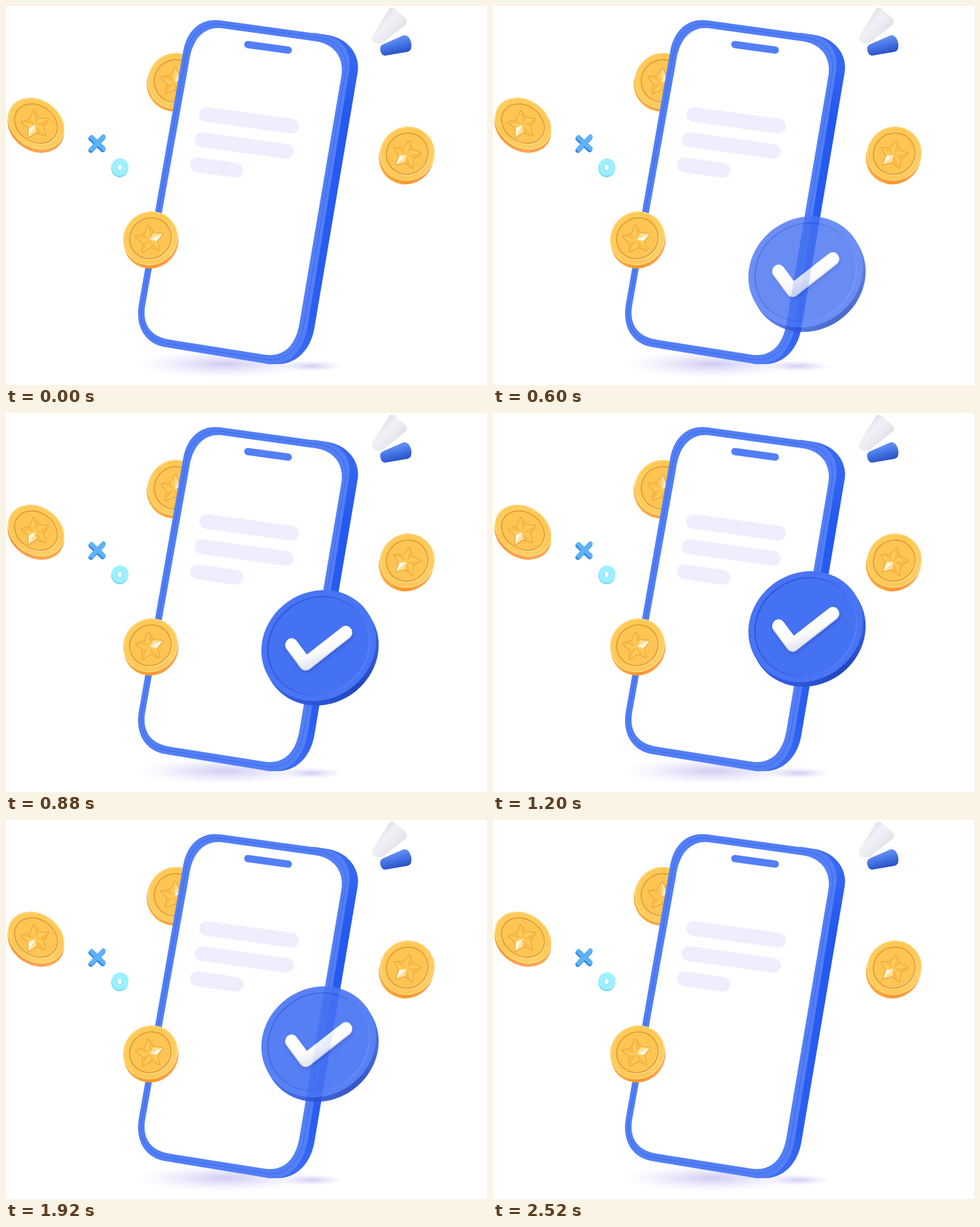
An HTML page for the animation above (2640 ms loop, 736 by 580 pixels).

```html
<!DOCTYPE html>
<html lang="en">
<head>
<meta charset="utf-8">
<title>Payment confirmed</title>
<style>
  html, body { margin: 0; width: 100%; height: 100%; overflow: hidden; background: #fff; }
  svg { display: block; width: 736px; height: 580px; }
</style>
</head>
<body>
<svg viewBox="0 0 736 580" xmlns="http://www.w3.org/2000/svg">
  <defs>
    <radialGradient id="shade">
      <stop offset="0" stop-color="#a9a3ea" stop-opacity=".55"/>
      <stop offset=".5" stop-color="#bbb7f0" stop-opacity=".28"/>
      <stop offset="1" stop-color="#d8d6fa" stop-opacity="0"/>
    </radialGradient>
    <linearGradient id="gold" x1="0" y1="0" x2="1" y2="1">
      <stop offset="0" stop-color="#ffcd60"/>
      <stop offset=".6" stop-color="#ffc853"/>
      <stop offset="1" stop-color="#ffd36c"/>
    </linearGradient>
    <linearGradient id="edge" x1="0" y1="0" x2="1" y2="1">
      <stop offset="0" stop-color="#ffbb48"/>
      <stop offset=".6" stop-color="#f8962e"/>
      <stop offset="1" stop-color="#ffb070"/>
    </linearGradient>
    <linearGradient id="side" x1="0" y1="0" x2="0" y2="1">
      <stop offset="0" stop-color="#3c6cf2"/>
      <stop offset=".25" stop-color="#2459f0"/>
      <stop offset=".85" stop-color="#2a5ef2"/>
      <stop offset="1" stop-color="#3f6cf2"/>
    </linearGradient>
    <linearGradient id="white" x1=".2" y1=".2" x2=".8" y2=".8">
      <stop offset="0" stop-color="#d9d9e4"/>
      <stop offset=".35" stop-color="#f0f0f6"/>
      <stop offset=".7" stop-color="#e9e9f0"/>
      <stop offset="1" stop-color="#d6d6de"/>
    </linearGradient>
    <linearGradient id="blue" x1=".2" y1="0" x2=".6" y2="1">
      <stop offset="0" stop-color="#7ba3f8"/>
      <stop offset=".5" stop-color="#4a78e8"/>
      <stop offset="1" stop-color="#2149bd"/>
    </linearGradient>
    <linearGradient id="rim" x1="0" y1="0" x2="1" y2="0">
      <stop offset="0" stop-color="#345ee2"/>
      <stop offset=".55" stop-color="#2145bd"/>
      <stop offset="1" stop-color="#3a62e0"/>
    </linearGradient>
    <linearGradient id="groove" x1=".2" y1="0" x2=".8" y2="1">
      <stop offset="0" stop-color="#2c53cf"/>
      <stop offset=".55" stop-color="#3a64e4"/>
      <stop offset="1" stop-color="#6189fc"/>
    </linearGradient>
    <linearGradient id="ivory" gradientUnits="userSpaceOnUse" x1="470" y1="330" x2="482" y2="364">
      <stop offset="0" stop-color="#fff"/>
      <stop offset=".6" stop-color="#fbfbfd"/>
      <stop offset="1" stop-color="#e6e8f2"/>
    </linearGradient>
    <filter id="soft" x="-30%" y="-30%" width="160%" height="160%"><feGaussianBlur stdDeviation="2.6"/></filter>
    <path id="tick" d="M437 338 L458.500 367 L520 319" fill="none" stroke-linecap="round" stroke-linejoin="round"/>
    <path id="cross" d="M131 201 L149 218 M149 200 L131 219" fill="none" stroke-linecap="round"/>
  </defs>

  <ellipse cx="335" cy="548" rx="138" ry="21" fill="url(#shade)"/>
  <ellipse cx="468" cy="551" rx="50" ry="9" fill="url(#shade)"/>

  <g id="back"></g>

  <g id="phone">
    <path fill="url(#side)" d="M470 41 L490 44 C521 48 543 73 538 102 L472 492 C467 524 446 547 418 548 L400 548 Z"/>
    <path fill="#527ff7" d="M271 70 C277 36 299 18 328 22 L484 43.500 C513 47.500 530 69 525 100 L462 488 C456 525 436 551 402 548 L244 522 C212 517 198 490 203 458 Z"/>
    <path fill="none" stroke="#3d69e2" stroke-width="1" d="M275 78 C280 43 301 25 329 28 L480 48.500 C509 52.500 524 75 519 104 L456 487 C450 522 431 545 398 541 L247 516.500 C217 511.500 203 489 208 458 Z"/>
    <path fill="#fff" d="M280 86 C285 50 303 31 330 34 L474 54 C503 58 518 80 513 108 L449 486 C443 520 425 538 395 533.500 L250 510.500 C221 506 208 487 213 458 Z"/>
    <path stroke="#527ff7" stroke-width="11" stroke-linecap="round" d="M370 59 L432 67.500"/>
    <path stroke="#eeeeff" stroke-width="22.500" stroke-linecap="round" d="M307 166 L437 184 M300 204.500 L429 222.500 M293 243 L352 251.500"/>
  </g>

  <g id="front"></g>

  <use href="#cross" y="2" x="-1" stroke="#3384da" stroke-width="7.500"/>
  <use href="#cross" stroke="#5eb2f8" stroke-width="7"/>
  <ellipse cx="174" cy="248.500" rx="13" ry="13.500" fill="#74d9ee"/>
  <ellipse cx="174.500" cy="246.500" rx="13" ry="13.300" fill="#9cf0ff"/>
  <ellipse cx="174" cy="247" rx="3.600" ry="4.800" fill="#fff" stroke="#7fdcf0"/>

  <path fill="url(#white)" d="M586 5 Q589 1 594 4 L611 18 Q615 22 612 28 L577 56 Q568 60 561 54 Q558 50 561 45 Z"/>
  <path fill="url(#blue)" d="M576 59 L608 45 Q616 43 620 56 Q622 68 615 70 L580 76 Q575 76 573 69 Q571 62 576 59 Z"/>

  <g id="badge" opacity="0">
    <g transform="translate(4 7) rotate(-35 478.500 339.500)">
      <ellipse cx="478.500" cy="339.500" rx="90.500" ry="82" fill="url(#rim)"/>
    </g>
    <g transform="rotate(-35 478.500 339.500)">
      <ellipse cx="478.500" cy="339.500" rx="90.500" ry="82" fill="#4875f6"/>
      <ellipse cx="478.500" cy="340" rx="80" ry="73" fill="#4572f2"/>
    </g>
    <ellipse cx="478.500" cy="340" rx="80" ry="73" fill="none" stroke="url(#groove)" stroke-width="2" transform="rotate(-35 478.500 340)"/>
    <use href="#tick" x="1" y="4" stroke="#274cc4" stroke-opacity=".55" stroke-width="20" filter="url(#soft)"/>
    <use href="#tick" y="1" stroke="#d9dcec" stroke-width="20"/>
    <use href="#tick" y="-.5" stroke="url(#ivory)" stroke-width="18.500"/>
  </g>
</svg>
<script>
  const STEP = 40, LOOP = 2640;
  const badge = document.getElementById('badge');
  const clamp = v => Math.min(1, Math.max(0, v));

  // Ten facets around the centre, alternately lit, with two bright ones.
  function star(radius, turn, lit) {
    const at = i => {
      const a = (turn - 90 + i * 36) * Math.PI / 180;
      const r = i % 2 ? radius * 0.52 : radius;
      return `${(r * Math.cos(a)).toFixed(1)} ${(r * Math.sin(a)).toFixed(1)}`;
    };
    let outline = '', facets = '';
    for (let i = 0; i < 10; i++) {
      outline += (i ? 'L' : 'M') + at(i);
      const fill = i === lit ? '#fff8e4' : i === (lit + 9) % 10 ? '#ffe09a' : i % 2 ? '#ffcb5a' : '#fcbb46';
      facets += `<path fill="${fill}" d="M0 0L${at(i)}L${at(i + 1)}Z"/>`;
    }
    return `<path d="${outline}Z" fill="#e0943a" stroke="#e0943a" stroke-width="2.600" stroke-linejoin="round"/>` +
      `<path d="${outline}Z" fill="#ffcb5a" stroke="#ffcb5a" stroke-width="1" stroke-linejoin="round"/>${facets}`;
  }

  function coin(layer, { x, y, rx, ry, tilt, dx, dy, turn, lit }) {
    const disc = (k, attrs) => `<ellipse rx="${rx * k}" ry="${ry * k}" transform="rotate(${tilt})" ${attrs}/>`;
    document.getElementById(layer).innerHTML += `<g transform="translate(${x} ${y})">
      <g transform="translate(${dx} ${dy})">${disc(1, 'fill="url(#edge)"')}</g>
      ${disc(1, 'fill="url(#gold)"')}
      ${disc(0.985, 'fill="none" stroke="#ffe09a" stroke-width="1"')}
      <g transform="translate(.8 1)">${disc(0.76, 'fill="none" stroke="#ffe6b0" stroke-width="1.500"')}</g>
      ${disc(0.76, 'fill="#fec553" stroke="#dd9434" stroke-width="1.500"')}
      <g transform="translate(-1 2)">${star(21.5, turn, lit)}</g></g>`;
  }

  coin('back', { x: 259, y: 114.5, rx: 43, ry: 42, tilt: -60, dx: -1.5, dy: 4, turn: 3, lit: 1 });
  coin('front', { x: 46, y: 180, rx: 46, ry: 36.5, tilt: 34, dx: -0.5, dy: 5, turn: -7, lit: 6 });
  coin('front', { x: 221, y: 355.5, rx: 42.5, ry: 40.5, tilt: -35, dx: 1, dy: 5, turn: -6, lit: 2 });
  coin('front', { x: 614, y: 226, rx: 42.5, ry: 41, tilt: -35, dx: -1.5, dy: 5.5, turn: 12, lit: 6 });

  // Straight drop past the resting place, then a springy return.
  function offset(t) {
    if (t <= 720) return -131 + 258 * clamp((t - 200) / 520);
    const q = clamp((t - 720) / 660) - 1;
    return -127 * (3.2 * q ** 3 + 2.2 * q * q);
  }

  function opacity(t) {
    if (t > 1900) return clamp(1 - (t - 1860) / 640);
    const p = clamp((t - 190) / 570);
    return p * p * (3 - 2 * p);
  }

  function draw(now) {
    const t = Math.floor((now % LOOP) / STEP) * STEP;
    badge.setAttribute('transform', `translate(0 ${offset(t).toFixed(2)})`);
    badge.setAttribute('opacity', opacity(t).toFixed(3));
  }

  const start = performance.now();
  function tick(now) {
    draw(Math.max(0, now - start));
    requestAnimationFrame(tick);
  }
  draw(0);
  requestAnimationFrame(tick);
</script>
</body>
</html>
```
